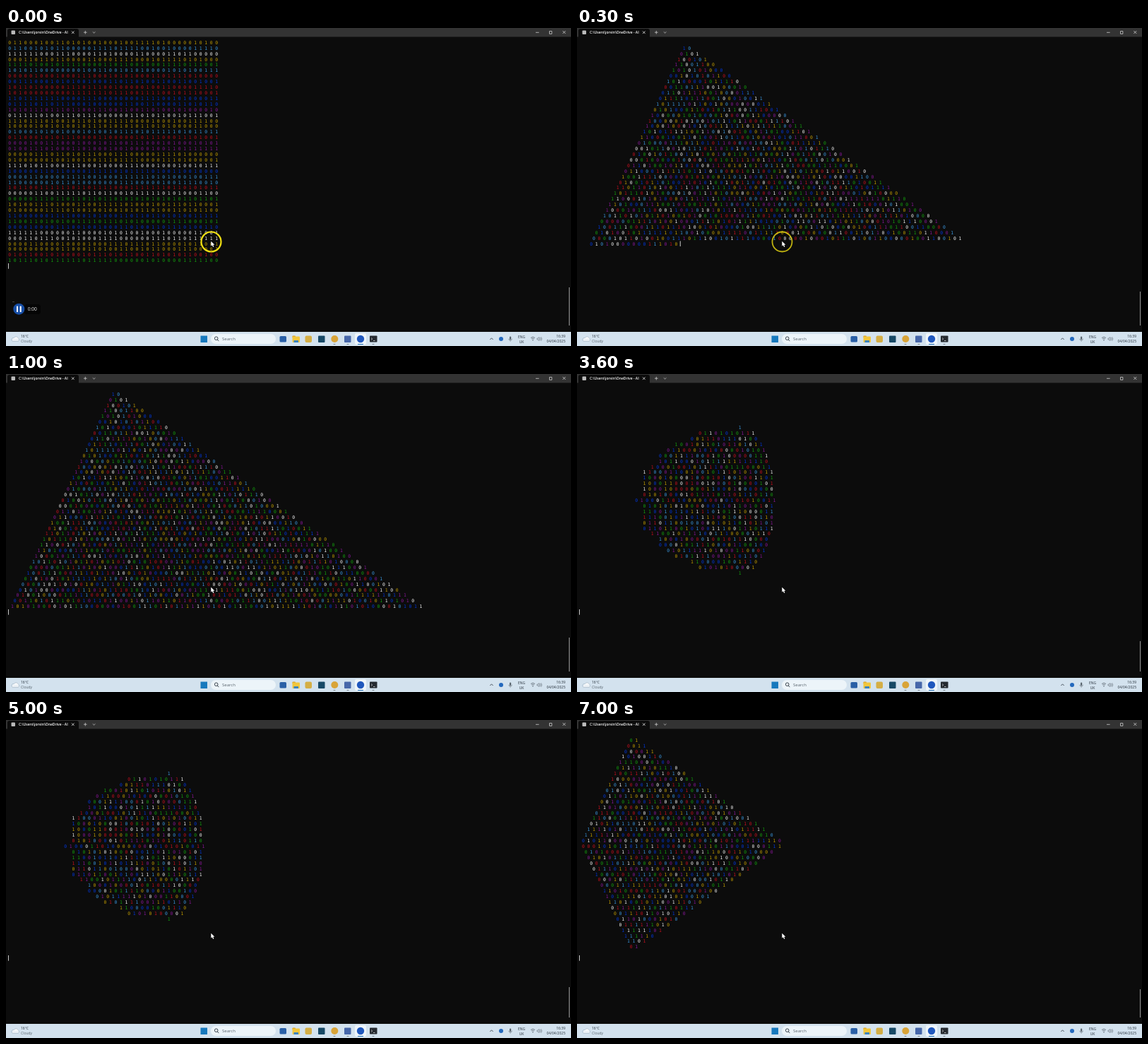
An HTML page with a canvas that plays this animation: 800x450 px, repeating every 8000 ms.

```html
<!DOCTYPE html>
<html lang="en">
<head>
<meta charset="utf-8">
<title>Terminal patterns</title>
<style>
  html, body { margin: 0; width: 100%; height: 100%; overflow: hidden; background: #0c0c0c; }
  canvas { display: block; width: 800px; height: 450px; }
</style>
</head>
<body>
<canvas id="stage" width="800" height="450"></canvas>
<script>
const ctx = document.getElementById('stage').getContext('2d');
const LOOP = 8000, STEP = 100;
const CHAR_W = 3.757, LINE_H = 7.91, LEFT = 3.3, TOP = 20.5;
const UI = '"Open Sans", "Noto Sans", sans-serif';
const MONO = '"DejaVu Sans Mono", monospace';
const COLORS = { r: '#c50f1f', g: '#13a10e', y: '#c19c00', b: '#0037da', p: '#881798', c: '#3a96dd', w: '#f2f2f2' };
const KEYS = Object.keys(COLORS);
const SQUARE_COLORS = 'ycwygcrbrrbbpwyycrppyywbccrwgyybgbwwyyrg';

function noise(seed) {
  let n = Math.imul(seed ^ (seed >>> 16), 0x45d9f3b);
  n = Math.imul(n ^ (n >>> 16), 0x45d9f3b);
  return ((n ^ (n >>> 16)) >>> 0) / 2 ** 32;
}

// Each pattern is a list of { line, column, count }; every digit is followed by a space.
const lines = (n, make) => Array.from({ length: n }, (_, i) => make(i));
const square = lines(40, i => ({ line: i, column: 0, count: 40 }));
const triangle = lines(39, i => ({ line: i + 1, column: 39 - i, count: 2 * i + 2 }));
const disc = lines(27, i => {
  const half = Math.floor(Math.sqrt(169 - (i - 13) ** 2));
  return { line: i + 7, column: 21 + 3 * (13 - half), count: 2 * half + 1 };
});
const diamond = lines(38, i => {
  const size = i < 19 ? i + 1 : 38 - i;
  return { line: i + 1, column: 20 - size, count: 2 * size };
});

const scenes = [
  { start: 0, rows: square, seed: 1, thumb: 367, rowColors: SQUARE_COLORS },
  { start: 100, rows: triangle, seed: 2, thumb: 373, typed: t => 2554 + (t - 300) * 8.8 },
  { start: 3600, rows: disc, seed: 3, thumb: 378 },
  { start: 6900, rows: diamond, seed: 4, thumb: 381, typed: t => 853 + (t - 6900) * 8.8 }
];

function box(x, y, w, h, color, radius = 0) {
  ctx.fillStyle = color;
  ctx.beginPath();
  ctx.roundRect(x, y, w, h, radius);
  ctx.fill();
}

function dot(x, y, r, color) {
  ctx.fillStyle = color;
  ctx.beginPath();
  ctx.arc(x, y, r, 0, 7);
  ctx.fill();
}

function stroke(path, color, width = 0.8) {
  ctx.strokeStyle = color;
  ctx.lineWidth = width;
  ctx.stroke(new Path2D(path));
}

function label(text, x, y, size, color, align = 'left', weight = 400) {
  ctx.font = `${weight} ${size}px ${UI}`;
  ctx.textAlign = align;
  ctx.fillStyle = color;
  ctx.fillText(text, x, y);
}

function drawPattern(scene, t) {
  let left = scene.typed ? Math.floor(scene.typed(t)) : Infinity;
  let cursor = { line: 40, column: 0 };
  ctx.font = `6.4px ${MONO}`;
  ctx.textAlign = 'center';
  for (const { line, column, count } of scene.rows) {
    for (let k = 0; k < count && 2 * k < left; k++) {
      const seed = scene.seed * 100003 + line * 211 + k;
      const key = scene.rowColors ? scene.rowColors[line] : KEYS[Math.floor(noise(seed + 7919001) * 7)];
      ctx.fillStyle = COLORS[key];
      ctx.fillText(noise(seed) < 0.5 ? '0' : '1', LEFT + (column + 2 * k + 0.5) * CHAR_W, TOP + line * LINE_H + 2.3);
    }
    if (left < 2 * count) {
      cursor = { line, column: column + left };
      break;
    }
    left -= 2 * count;
  }
  box(LEFT + cursor.column * CHAR_W - 0.3, TOP + cursor.line * LINE_H - 3.8, 0.9, 7.6, '#ddd');
  box(797, scene.thumb, 1, 421 - scene.thumb, '#9a9a9a');
}

function drawTitleBar() {
  box(0, 0, 800, 12.5, '#333');
  box(2, 1, 101, 12, '#0c0c0c', [3, 3, 0, 0]);
  box(7.5, 3.5, 5.5, 5.5, '#bbb', 1);
  label('C:\\Users\\jorvin\\OneDrive - AI', 18, 8.2, 5, '#fff', 'left', 600);
  stroke('M93 4.5l3.6 3.6m0-3.6l-3.6 3.6', '#eee');
  stroke('M110 6.2h4.6m-2.3-2.3v4.6M122.8 5.4l1.8 1.7 1.8-1.7M750 6.3h4.6M788.3 4l4 4m0-4l-4 4', '#ccc');
  stroke('M769.5 4.5h3.4v3.8h-3.4z', '#ccc');
}

function drawTaskbar() {
  const ink = '#27313b', faint = '#59646e';
  box(0, 430, 800, 20, '#d3e2ee');
  dot(11.5, 441, 2.5, '#f5f8fa');
  dot(14.5, 440, 3.2, '#f5f8fa');
  box(8.5, 440.5, 10, 3.2, '#e8eef3', 1.6);
  stroke('M9.5 443.5h7.5a2.4 2.4 0 0 0 .3-4.5a3.2 3.2 0 0 0-6-.4a2.5 2.5 0 0 0-1.8 4.9', '#9db1c2', 0.6);
  label('16°C', 21, 438.4, 5, ink);
  label('Cloudy', 21, 445.4, 5, faint);

  box(275.5, 435.5, 9.5, 9.5, '#1779bd');
  box(290, 433, 92, 14, '#ecf4f9', 7);
  stroke('M300 439.2a2.3 2.3 0 1 0-4.6 0a2.3 2.3 0 1 0 4.6 0m-.7 1.7l2 2.2', ink, 0.9);
  label('Search', 306, 442.2, 6, faint);

  box(387.5, 436, 9.5, 8.5, '#295fa6', 1.5);
  box(405.5, 435.5, 4.5, 3, '#d99b18', 1);
  box(405.5, 436.5, 10.5, 8.5, '#f1c63c', 1);
  box(407.5, 442, 6.5, 3, '#3b83bd', 0.5);
  box(423.5, 435.5, 9.5, 9.5, '#d4ae45', 2);
  box(442, 435.5, 9.5, 9.5, '#174966', 1);
  dot(465.3, 440, 5, '#d9a438');
  box(479, 435.5, 9.5, 9.5, '#4767a9', 1);
  box(494, 432, 16, 16, '#eef5fa', 2);
  dot(502, 440, 5.2, '#2058bd');
  box(515, 435.5, 10.5, 9, '#252a30', 0.8);
  stroke('M517 438.5l1.7 1.5-1.7 1.5m3 1h2.5', '#eee', 0.7);
  for (const x of [465, 484, 520]) box(x - 1.5, 447, 3, 1, '#7d8790', 0.5);
  box(498, 447, 8, 1, '#2470b5', 0.5);

  stroke('M685.3 441l2.2-2.2 2.2 2.2', ink);
  dot(701, 440, 3, '#2469bd');
  box(713, 436.5, 2.2, 4.5, faint, 1.1);
  stroke('M711.8 439.7a2.3 2.3 0 0 0 4.6 0m-2.3 2.3v1.5', faint, 0.6);
  label('ENG', 730, 438.8, 5, ink, 'center');
  label('UK', 730, 445.5, 5, ink, 'center');
  stroke('M743 438.5q3-2.6 6 0m-4.8 1.5q1.8-1.5 3.6 0', faint, 0.8);
  dot(746, 441.7, 0.8, faint);
  stroke('M752 439h1.2l1.8-1.5v5l-1.8-1.5h-1.2zM756.3 438.2q1.5 1.8 0 3.6m1.3-4.6q2.3 2.8 0 5.6', faint, 0.6);
  label('16:39', 792, 438.4, 5, ink, 'right');
  label('04/04/2025', 792, 445.4, 5, ink, 'right');
}

function drawRecorder() {
  box(9, 387, 3, 0.7, '#555');
  box(26, 391, 23, 14, '#050505', 4);
  dot(18.3, 397.7, 8, '#174ea6');
  box(15, 393.5, 2, 8.5, '#fff', 0.5);
  box(19.7, 393.5, 2, 8.5, '#fff', 0.5);
  label('0:00', 30.7, 400.2, 6.6, '#eee');
}

function drawPointer(t) {
  if (t < 1000) {
    ctx.globalAlpha = 1 - (t / 1000) ** 1.3;
    ctx.strokeStyle = '#f0df12';
    ctx.lineWidth = t < 100 ? 2.2 : 1.8;
    ctx.beginPath();
    ctx.arc(290.5, 302.5, 14, 0, 7);
    ctx.stroke();
    ctx.globalAlpha = 1;
  }
  const arrow = new Path2D('M290.3 301.8v7l1.6-1.5 1.2 2.7 1.3-.6-1.2-2.6h2.2z');
  ctx.strokeStyle = '#000';
  ctx.lineWidth = 1;
  ctx.stroke(arrow);
  ctx.fillStyle = '#fff';
  ctx.fill(arrow);
}

function draw(t) {
  box(0, 0, 800, 450, '#0c0c0c');
  drawPattern(scenes.findLast(scene => scene.start <= t), t);
  if (t < 100) drawRecorder();
  drawPointer(t);
  drawTitleBar();
  drawTaskbar();
}

let shown = -1;
function tick() {
  const t = Math.floor((performance.now() % LOOP) / STEP) * STEP;
  if (t !== shown) draw(shown = t);
  requestAnimationFrame(tick);
}
tick();
</script>
</body>
</html>
```
